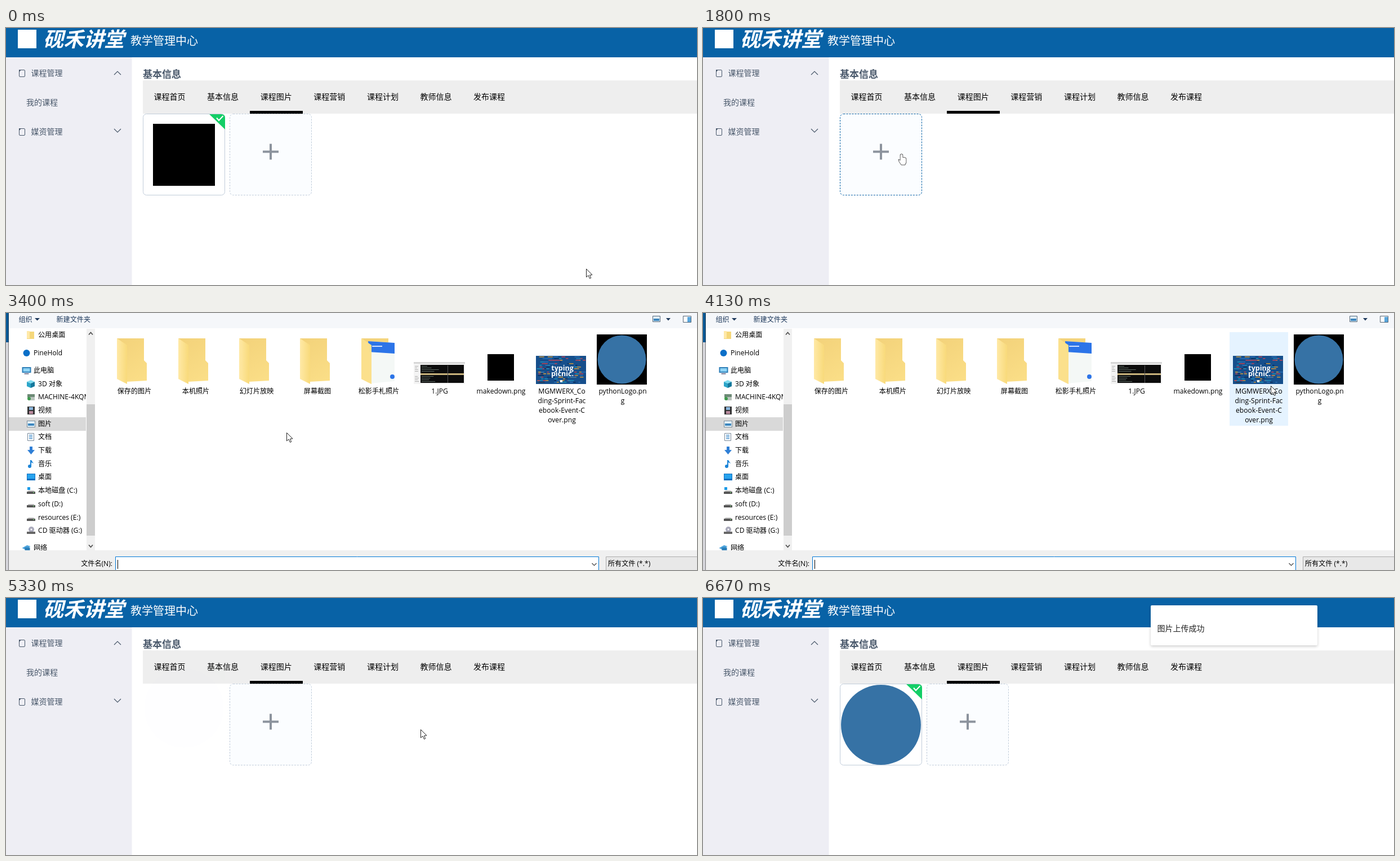
These frames come from a looping animation (1227 px wide and 456 px high, 7.54 s). An HTML page with a canvas:

```html
<!DOCTYPE html>
<html lang="zh-CN">
<head>
<meta charset="utf-8">
<title>课程图片上传</title>
<style>
html, body { margin: 0; width: 100%; height: 100%; overflow: hidden; background: #fff; }
canvas { display: block; width: 1227px; height: 456px; }
</style>
</head>
<body>
<canvas id="stage" width="1227" height="456"></canvas>
<script>
const ctx = document.getElementById('stage').getContext('2d');
const W = 1227, H = 456, LOOP = 7540, TICK = 200 / 3;
const BLUE = '#0862a6', INK = '#48576a';
const PAGE_FONT = '"Noto Sans CJK SC", "Noto Sans CJK", sans-serif';
const DIALOG_FONT = '"Open Sans", "Noto Sans CJK SC", "Noto Sans CJK", sans-serif';

// ---- drawing helpers ----
function rect(x, y, w, h, color) {
  ctx.fillStyle = color;
  ctx.fillRect(x, y, w, h);
}
function poly(points, fill, stroke, width = 1) {
  ctx.beginPath();
  points.forEach(([x, y]) => ctx.lineTo(x, y));
  if (fill) { ctx.closePath(); ctx.fillStyle = fill; ctx.fill(); }
  if (stroke) { ctx.strokeStyle = stroke; ctx.lineWidth = width; ctx.stroke(); }
}
function circle(x, y, r, color) {
  ctx.beginPath();
  ctx.arc(x, y, r, 0, 7);
  ctx.fillStyle = color;
  ctx.fill();
}
function box(x, y, w, h, r, fill, stroke, dash = []) {
  ctx.beginPath();
  ctx.roundRect(x, y, w, h, r);
  if (fill) { ctx.fillStyle = fill; ctx.fill(); }
  if (stroke) {
    ctx.setLineDash(dash);
    ctx.strokeStyle = stroke;
    ctx.lineWidth = 1;
    ctx.stroke();
    ctx.setLineDash([]);
  }
}
function text(s, x, y, size, color, { style = '', font = PAGE_FONT, align = 'left' } = {}) {
  ctx.font = `${style} ${size}px ${font}`;
  ctx.textAlign = align;
  ctx.fillStyle = color;
  ctx.fillText(s, x, y + size * 0.37);
}
const label = (s, x, y, color = '#000', align = 'left') =>
  text(s, x, y, 12.1, color, { font: DIALOG_FONT, align });
function chevron(x, y, rx, ry, color, width = 1.2) {
  poly([[x - rx, y - ry], [x, y + ry], [x + rx, y - ry]], null, color, width);
}
function at(x, y, alpha, draw) {
  ctx.save();
  ctx.translate(x, y);
  ctx.globalAlpha = alpha;
  draw();
  ctx.restore();
}

// ---- motion helpers ----
const clamp = v => Math.max(0, Math.min(1, v));
const span = (t, start, length) => clamp((t - start) / length);
function bezier(x1, y1, x2, y2) {
  const curve = (a, b, s) => 3 * (1 - s) ** 2 * s * a + 3 * (1 - s) * s * s * b + s ** 3;
  return x => {
    let lo = 0, hi = 1;
    for (let i = 0; i < 24; i++) {
      const mid = (lo + hi) / 2;
      if (curve(x1, x2, mid) < x) lo = mid; else hi = mid;
    }
    return x <= 0 ? 0 : x >= 1 ? 1 : curve(y1, y2, lo);
  };
}
const ease = bezier(0.25, 0.1, 0.25, 1);
const slide = bezier(0.55, 0, 0.1, 1);
function random(seed) {
  return () => (seed = (seed * 16807) % 2147483647) / 2147483647;
}

// time, x, y
const PATH = [
  [0, 1030, 427], [200, 900, 380], [400, 640, 270], [600, 390, 192], [667, 345, 185],
  [800, 329, 216], [933, 323, 217], [1333, 323, 217], [1800, 352, 224], [1867, 352, 224],
  [2000, 359, 225], [2400, 359, 225], [2933, 372, 229], [3000, 372, 229], [3067, 367, 233],
  [3200, 367, 233], [4000, 890, 150], [4133, 1008, 129], [4733, 1085, 84], [5000, 1085, 84],
  [5533, 527, 322], [6400, 527, 322], [6600, 290, 440], [6667, 240, 480], [7540, 240, 480]
];
function pointer(t) {
  const i = Math.max(1, PATH.findIndex(p => p[0] >= t));
  const [t0, x0, y0] = PATH[i - 1], [t1, x1, y1] = PATH[i];
  const p = span(t, t0, t1 - t0);
  return [Math.round(x0 + (x1 - x0) * p), Math.round(y0 + (y1 - y0) * p)];
}
function drawPointer(x, y, hand) {
  at(x, y, 1, () => {
    if (hand) {
      ctx.beginPath();
      ctx.roundRect(-1.5, 0, 4, 13, 2);
      ctx.roundRect(-1.5, 6, 10, 11, 3);
      ctx.fillStyle = '#fff';
      ctx.strokeStyle = '#333';
      ctx.lineWidth = 1.5;
      ctx.stroke();
      poly([[-1, 11], [-5, 9], [-4, 13], [0, 19], [7, 19], [8, 14]], '#fff', '#333', 0.8);
      ctx.beginPath();
      ctx.roundRect(-1.5, 0, 4, 13, 2);
      ctx.roundRect(-1.5, 6, 10, 11, 3);
      ctx.fill();
    } else {
      const p = [[0, 0], [0, 14.5], [3.5, 11.5], [6, 17], [8.2, 16], [6, 10.8], [10.5, 10.5], [0, 0]];
      poly(p.map(([a, b]) => [a + 0.5, b + 0.5]), '#fff', '#222', 1);
    }
  });
}

// ---- web page ----
const TABS = ['课程首页', '基本信息', '课程图片', '课程营销', '课程计划', '教师信息', '发布课程'];

function docIcon(x, y) {
  box(x - 4.5, y - 5.5, 10, 12, 1.5, null, INK);
  poly([[x - 5, y - 1], [x - 1, y - 6], [x - 5, y - 6]], INK);
}
function drawPage() {
  rect(0, 0, W, H, '#fff');
  rect(0, 0, W, 52, BLUE);
  rect(21, 3, 33, 33, '#fff');
  text('砚禾讲堂', 66, 19.5, 36, '#fff', { style: 'italic 900' });
  text('教学管理中心', 221, 22.5, 20, '#fff');

  rect(0, 52, 223.5, 404, '#eeeef4');
  docIcon(28, 80);
  text('课程管理', 44.5, 80, 14, INK);
  chevron(198, 80, 6, -3, INK);
  text('我的课程', 36, 132, 14, INK);
  docIcon(28, 184);
  text('媒资管理', 44.5, 184, 14, INK);
  chevron(198, 182, 6, 3, INK);

  text('基本信息', 243, 82, 17, '#475669', { style: 'bold' });
  rect(243, 93, W - 243, 59, '#eee');
  TABS.forEach((s, i) => text(s, 262.5 + i * 94.6, 122, 14, '#000'));
  rect(433, 147, 94, 5, '#000');
}
function plusCard(x, hot) {
  box(x + 0.5, 152.5, 145, 144, 6, '#fbfdff', hot ? BLUE : '#c0ccda', [3, 2]);
  rect(x + 59, 217.5, 28, 4, '#8c939d');
  rect(x + 71, 205.5, 4, 28, '#8c939d');
}
function trash(x, y) {
  rect(x - 8, y - 7, 16, 2, '#fff');
  rect(x - 3, y - 10, 6, 2, '#fff');
  box(x - 5.5, y - 4.5, 11, 14, 1, null, '#fff');
  for (const dx of [-2.5, 1.5]) rect(x + dx, y - 2, 1.2, 9, '#fff');
}
function imageCard(dy, alpha, mark, shade, checked) {
  at(243, 152 + dy, alpha, () => {
    box(0.5, 0.5, 145, 144, 6, '#fff', '#c0ccda');
    mark();
    if (checked) {
      ctx.beginPath();
      ctx.roundRect(1, 1, 145, 144, 6);
      ctx.clip();
      poly([[117, 0], [147, 0], [147, 29]], '#13ce66');
      poly([[131, 7.5], [135, 12], [142.5, 4]], null, '#fff', 2);
    }
    if (shade) {
      ctx.globalAlpha = alpha * shade;
      box(0, 0, 146, 145, 6, 'rgba(0,0,0,.5)');
      trash(73, 71);
    }
  });
}
const squareMark = () => rect(18, 18, 110, 110, '#000');
const roundMark = () => circle(73, 73, 71, '#3672a5');

function drawUploads(t) {
  const leaving = t < 1800, added = t >= 5333;
  plusCard(leaving || added ? 397 : 243, t >= 1800 && t < 5067);
  if (leaving) {
    const out = slide(span(t, 1333, 500));
    imageCard(-30 * out, 1 - out, squareMark, ease(span(t, 1030, 400)), t < 1067);
  } else if (added) {
    const p = slide(span(t, 5310, 500));
    imageCard(-30 * (1 - p), p, roundMark, 0, true);
  }
}
function drawToast(t) {
  if (t < 5400) return;
  const y = 13 - 71 * (1 - ease(span(t, 5400, 400)));
  at(795, y, ease(span(t, 5400, 300)), () => {
    ctx.shadowColor = 'rgba(0,0,0,.2)';
    ctx.shadowBlur = 5;
    ctx.shadowOffsetY = 2;
    box(0, 0, 296, 71, 2, '#fff');
    ctx.shadowColor = 'transparent';
    text('图片上传成功', 11.5, 40.5, 14, '#222');
  });
}

// ---- file dialog ----
const icons = {
  folder() { rect(0, 1, 13, 13, '#f5d77a'); rect(0, 0, 5, 13, '#ffe9a8'); },
  dot() { circle(8, 7, 6, '#0a6fc8'); },
  screen() { rect(0, 1, 16, 10, '#2d7fb8'); rect(2, 3, 12, 6, '#8fd4f5'); rect(4, 12, 8, 1.5, '#557'); },
  cube() {
    poly([[7, 0], [14, 3], [7, 6], [0, 3]], '#7fdcf0');
    poly([[0, 3], [7, 6], [7, 14], [0, 11]], '#2ba5c9');
    poly([[14, 3], [7, 6], [7, 14], [14, 11]], '#15789c');
  },
  server() { rect(1, 2, 13, 6, '#6d8a76'); rect(4, 7, 10, 6, '#b9c4bd'); circle(4, 10, 3, '#3d9a4c'); },
  film() { rect(1, 0, 13, 14, '#333'); rect(4, 1, 7, 5, '#8bb6dd'); rect(4, 8, 7, 5, '#b98a9d'); },
  picture() { rect(0, 1, 15, 12, '#7d8b96'); rect(1, 2, 13, 10, '#e4f4ff'); rect(2, 6, 11, 4, '#3d86bd'); },
  page() { box(1.5, 0.5, 11, 13, 0, '#fff', '#789'); for (const y of [3, 6, 9]) rect(4, y, 6, 1.5, '#4d94cf'); },
  down() { poly([[5, 0], [10, 0], [10, 6], [14, 6], [7.5, 14], [1, 6], [5, 6]], '#2f7fd6'); },
  note() { rect(6, 0, 2, 11, '#1b84d8'); circle(5, 11, 3, '#1b84d8'); poly([[8, 0], [12, 6], [8, 4]], '#1b84d8'); },
  desk() { rect(0, 1, 15, 12, '#0f6fc0'); rect(1, 2, 13, 8, '#27a3ee'); },
  system() { rect(1, 1, 5, 5, '#1b9be8'); icons.drive(); },
  drive() { poly([[3, 7], [12, 7], [14, 9], [1, 9]], '#bbb'); rect(0, 9, 15, 4, '#555'); rect(11, 10, 2, 1, '#7e7'); },
  disc() { circle(8, 5, 5, '#aab'); circle(8, 5, 1.5, '#fff'); rect(0, 9, 15, 4, '#666'); },
  net() { poly([[0, 7], [9, 2], [15, 4], [6, 10]], '#4ba3dc'); rect(5, 6, 9, 6, '#2b7fb9'); }
};
const PLACES = [
  ['公用桌面', 38.5, 'folder'], ['PineHold', 70.5, 'dot', 1], ['此电脑', 102, 'screen', 1],
  ['3D 对象', 125.5, 'cube'], ['MACHINE-4KQM', 149, 'server'], ['视频', 173, 'film'],
  ['图片', 197, 'picture'], ['文档', 220, 'page'], ['下载', 244, 'down'], ['音乐', 267.5, 'note'],
  ['桌面', 291, 'desk'], ['本地磁盘 (C:)', 315, 'system'], ['soft (D:)', 338.5, 'drive'],
  ['resources (E:)', 362.5, 'drive'], ['CD 驱动器 (G:)', 386, 'disc'], ['网络', 417, 'net', 1]
];

// thumbnails are drawn around the column centre
function folder() {
  const g = ctx.createLinearGradient(-28, 45, 22, 122);
  g.addColorStop(0, '#f3d27a');
  g.addColorStop(1, '#fbdf88');
  poly([[-31, 45], [17, 45], [17, 84], [22, 89], [22, 120], [-14, 122]], g);
  const f = ctx.createLinearGradient(-31, 0, -12, 0);
  f.addColorStop(0, '#ffe9a6');
  f.addColorStop(1, '#f8d978');
  poly([[-31, 45], [-13, 57], [-13, 126], [-31, 117]], f);
}
function paperFolder() {
  folder();
  poly([[-19, 50], [28, 53], [28, 121], [-16, 125]], '#f4f8f6');
  poly([[-19, 50], [28, 53], [28, 72], [-18, 69]], '#2c74e8');
  rect(-12, 58, 18, 2, '#cfe0ff');
  circle(24, 113, 4, '#2c74e8');
  poly([[-31, 45], [-13, 57], [-13, 126], [-31, 117]], '#fbe08c');
}
function screenshot() {
  const rnd = random(11);
  rect(-46, 87, 91, 39, '#f4f4f4');
  rect(-46, 87, 91, 3, '#d6d6d6');
  rect(-34, 92, 77, 32, '#0c0c0c');
  rect(-34, 107, 77, 3, '#c9b37c');
  for (let i = 0; i < 8; i++) {
    const y = i < 4 ? 94 + i * 3 : 100 + i * 3;
    rect(-32, y, 10 + rnd() * 24, 1, '#5d6a63');
    rect(-44, y, 4 + rnd() * 4, 1, '#aaa');
  }
  rect(14, 93, 1, 31, '#555');
}
function markThumb() {
  rect(-46, 67, 91, 60, '#fff');
  rect(-24, 73, 47, 47, '#000');
}
function banner() {
  const rnd = random(5), hues = ['#2a6fb5', '#1d8fb8', '#b8465a', '#c9963f', '#0e2f5c'];
  rect(-46, 76, 89, 50, '#164f8c');
  for (let i = 0; i < 130; i++) {
    const w = 3 + rnd() * 8;
    rect(-46 + rnd() * (89 - w), 77 + Math.floor(rnd() * 16) * 3, w, 1.6, hues[Math.floor(rnd() * 5)]);
  }
  rect(-21, 92, 43, 21, '#164f8c');
  const opt = { style: 'bold', font: DIALOG_FONT, align: 'center' };
  text('typing', 1, 97, 12.5, '#fff', opt);
  text('picnic.', 1, 107, 12.5, '#fff', opt);
  rect(-3, 119, 4, 4, '#fff');
}
function roundThumb() {
  rect(-46, 38, 89, 89, '#000');
  circle(-1.5, 82.5, 43, '#3672a5');
}
const FILES = [
  [folder, '保存的图片'], [folder, '本机照片'], [folder, '幻灯片放映'], [folder, '屏幕截图'],
  [paperFolder, '松影手札照片'], [screenshot, '1.JPG'], [markThumb, 'makedown.png'],
  [banner, 'MGMWERX_Co', 'ding-Sprint-Fac', 'ebook-Event-C', 'over.png'],
  [roundThumb, 'pythonLogo.pn', 'g']
];

function drawPlaces() {
  ctx.save();
  ctx.beginPath();
  ctx.rect(5, 28, 137, 393);
  ctx.clip();
  rect(5, 185, 137, 24, '#d9d9d9');
  for (const [name, y, icon, top] of PLACES) {
    at(top ? 28.5 : 37, Math.round(y - 7), 1, icons[icon]);
    label(name, top ? 49 : 57, y);
  }
  ctx.restore();
  rect(143, 28, 15, 393, '#f0f0f0');
  rect(143, 162, 15, 233, '#cdcdcd');
  chevron(150.5, 36.5, 3.5, -2, '#505050', 1.8);
  chevron(150.5, 413.5, 3.5, 2, '#505050', 1.8);
}
function drawFiles(x, y, picked) {
  FILES.forEach(([thumb, ...lines], i) => {
    const left = Math.round(935 + 108.4 * (i - 7)), height = 115 + 17 * (lines.length - 1);
    const hover = x >= left && x < left + 104 && y >= 34 && y < 34 + height;
    if (picked && i === 8) box(left + 0.5, 34.5, 102, height, 0, '#cce8ff', '#99d1ff');
    else if (hover) rect(left, 34, 104, height, '#e5f3ff');
    at(left + 52, 0, 1, thumb);
    lines.forEach((s, n) => label(s, left + 52, 139 + n * 16.7, '#000', 'center'));
  });
}
function drawToolbar() {
  const navy = '#1e395b';
  label('组织', 22.5, 11.5, navy);
  poly([[51, 9], [60, 9], [55.5, 13.5]], navy);
  label('新建文件夹', 89.5, 11.5, navy);
  box(1148.5, 5.5, 13, 10, 0, '#dff0fb', '#567');
  rect(1150, 10, 10, 4, '#3d86bd');
  poly([[1172, 9], [1180, 9], [1176, 13.5]], navy);
  box(1202.5, 5.5, 14, 11, 0, '#fff', '#567');
  rect(1210, 7, 6, 9, '#58a6dc');
}
function drawDialogEdge() {
  rect(0, 0, 4, H, 'rgba(0,0,0,.1)');
  rect(4, 0, 1, H, 'rgba(40,40,40,.6)');
}
function drawDialog(t, x, y) {
  const ready = t >= 3267, picked = t >= 4933;
  rect(5, 0, W - 5, H, '#fff');
  rect(5, 0, W - 5, 27, '#f5f7fa');
  rect(5, 421, W - 5, 35, '#f0f0f0');
  if (!ready) return;
  drawToolbar();
  drawPlaces();
  drawFiles(x, y, picked);
  label('文件名(N):', 189, 445, '#000', 'right');
  box(194.5, 432.5, 858, 26, 0, '#fff', picked ? '#7a7a7a' : '#0078d7');
  if (picked) label('pythonLogo.png', 198.5, 446);
  else rect(198, 438, 1, 16, '#000');
  chevron(1044.5, 446, 4, 2, '#444');
  box(1065.5, 432.5, 170, 26, 0, '#e8e8e8', '#adadad');
  label('所有文件 (*.*)', 1069, 445);
}

// ---- loop ----
function render(ms) {
  const t = Math.round(Math.floor((ms % LOOP + 4) / TICK) * TICK);
  const [x, y] = pointer(t);
  drawPage();
  drawUploads(t);
  drawToast(t);
  if (t >= 3067 && t < 5067) {
    drawDialogEdge();
    if (t >= 3133) drawDialog(t, x, y);
  }
  drawPointer(x, y, t >= 1067 && t < 3067);
}
const start = performance.now();
function frame() {
  render(performance.now() - start);
  requestAnimationFrame(frame);
}
frame();
</script>
</body>
</html>
```
